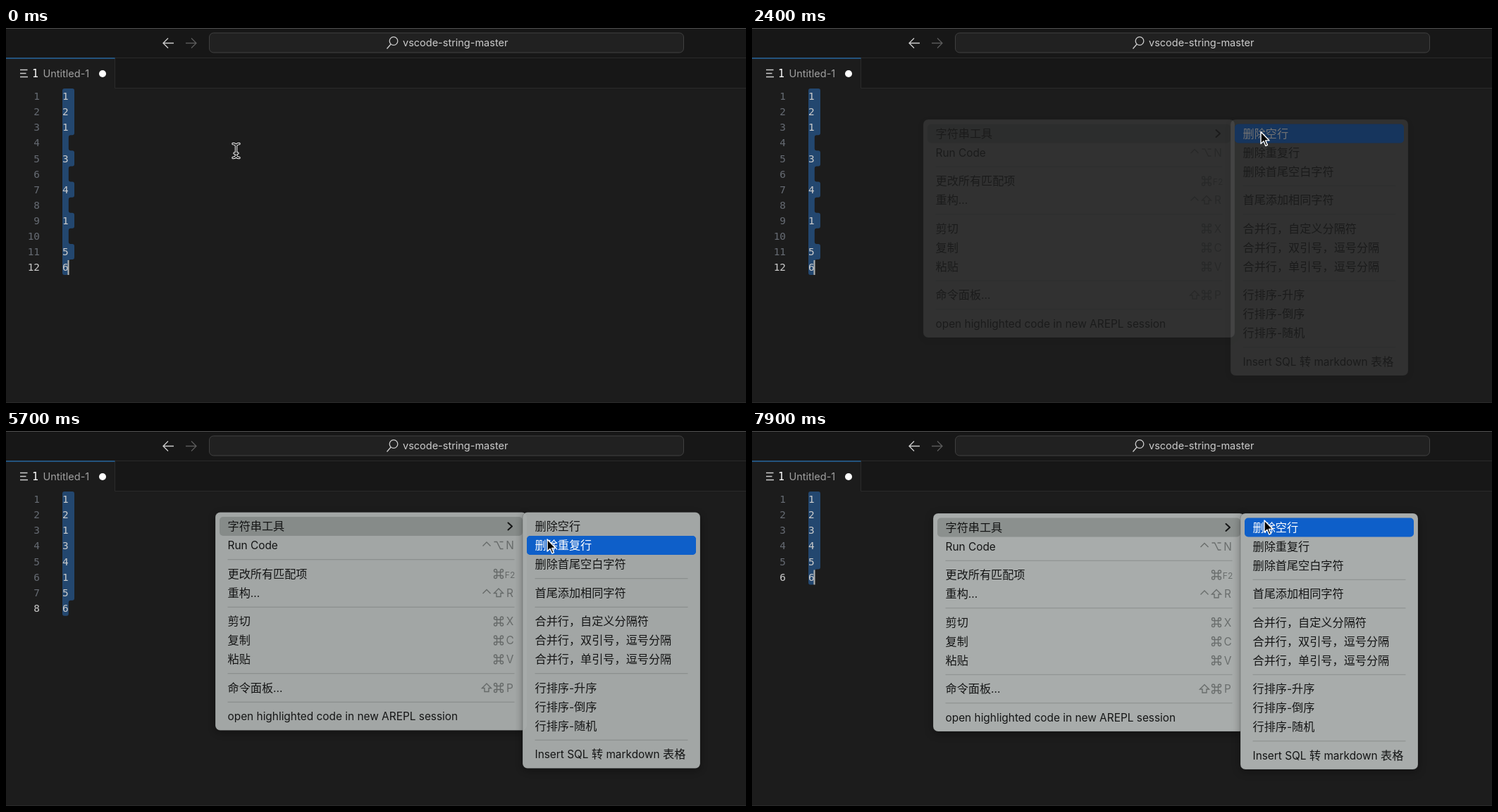
Recreate the animation shown at these times as an HTML page. Size 1050x533 px, loop 8 s.

```html
<!DOCTYPE html>
<html lang="zh-CN">
<head>
<meta charset="utf-8">
<title>String tools</title>
<style>
  html, body { margin: 0; width: 100%; height: 100%; overflow: hidden; background: #1c1c1c; }
  svg { display: block; }
  text { font-family: Inter, "Open Sans", sans-serif; white-space: pre; }
  .code text, .mono { font-family: "DejaVu Sans Mono", monospace; font-size: 14.4px; }
  .line { fill: none; stroke-width: 1.3; }
  .num { fill: #666b73; text-anchor: end; }
  .num.now { fill: #ccc; }
  .menu .bg { fill: #a8acab; stroke: rgba(0, 0, 0, .18); filter: drop-shadow(0 3px 6px rgba(0, 0, 0, .35)); }
  .menu .sep { stroke: #8a8e8d; }
  .row text { font-size: 15.4px; fill: #141515; }
  .row .cjk { font-family: "Noto Sans CJK SC", "Noto Sans CJK", sans-serif; font-size: 16.15px; }
  .row .hl { fill: none; }
  .row .key { fill: #6a6e6d; text-anchor: middle; }
  .row .small { font-size: 12px; }
  .row .sym { fill: none; stroke: #6a6e6d; stroke-width: 1.4; }
  .row .chev { fill: none; stroke: #141515; stroke-width: 2; stroke-linecap: round; stroke-linejoin: round; }
  .row.open .hl { fill: #8b908e; }
  .row.on .hl { fill: #0e5fc9; }
  .row.on text { fill: #fff; }
  .row.on .chev { stroke: #fff; }
</style>
</head>
<body>
<svg width="1050" height="533" viewBox="0 0 1050 533">
  <defs>
    <path id="beamShape" d="M-4.5-10Q-1-10 0-7.5Q1-10 4.5-10M0-7.5V7.5M-4.5 10Q-1 10 0 7.5Q1 10 4.5 10M-2.5 3.5H2.5"/>
  </defs>
  <rect width="1050" height="533" fill="#1c1c1c"/>
  <rect width="1050" height="85" fill="#171717"/>
  <rect y="43" width="154" height="43" fill="#1c1c1c"/>
  <path d="M0 .5H1050" stroke="#505050"/>
  <path d="M0 42.5H1050M154.5 43V85.5H1050M0 532.5H1050" fill="none" stroke="#2a2a2a"/>
  <path d="M0 43H154.5" stroke="#24659c" stroke-width="1.6"/>

  <g class="line" stroke="#ccc">
    <path d="M238 21.5H223M230 14.5L223 21.5L230 28.5"/>
    <path d="M255 21.5H270M263 14.5L270 21.5L263 28.5" stroke="#5a5a5a"/>
    <rect x="288.5" y="7" width="673" height="28" rx="6" fill="#212121" stroke="#404040" stroke-width="1"/>
    <circle cx="550" cy="18.5" r="5.8"/>
    <path d="M546 23L540.5 29.5M20 59.5H30.5M20 64.5H28.5M20 69.5H31"/>
  </g>
  <text x="563" y="26.3" font-size="14.5" fill="#ccc">vscode-string-master</text>
  <text class="mono" x="37" y="70.3" fill="#fff" style="font-size:15px">1</text>
  <text x="52.5" y="70.3" font-size="14.5" fill="#a0a0a0">Untitled-1</text>
  <circle cx="137" cy="65" r="5" fill="#fff"/>

  <g class="code" id="code"></g>
  <rect id="caret" x="87.5" width="2" height="21" fill="#b4b5b3"/>
  <g class="menu" id="main"></g>
  <g class="menu" id="sub"></g>
  <g id="pick"></g>

  <path id="arrow" d="M0 0V17L4 13.3L6.8 20L9.4 18.9L6.6 12.4H12Z" stroke="#fff" stroke-width="1.4" stroke-linejoin="round"/>
  <g id="beam" fill="none" stroke-linecap="round">
    <use href="#beamShape" stroke="#fff" stroke-width="3.4"/>
    <use href="#beamShape" stroke="#000" stroke-width="1.3"/>
  </g>
</svg>

<script>
const $ = id => document.getElementById(id);
const LOOP = 8000, STEP = 100;
const ROW = 27, GAP = 13.5, PAD = 6.5, SUB_X = 436;
const LINE_H = 22.09, TOP = 86;

const SYMBOLS = {
  '^': 'M-5.5 1L0-4.5L5.5 1',
  '⌥': 'M-6.5-5H-2.5L2.5 5H6.5M1.5-5H6.5',
  '⇧': 'M0-6L6.5 .5H3V5.5H-3V.5H-6.5Z',
  '⌘': 'M-2.5-2.5H2.5V2.5H-2.5ZM-2.5-2.5h-2a2 2 0 1 1 2-2zM2.5-2.5v-2a2 2 0 1 1 2 2zM2.5 2.5h2a2 2 0 1 1-2 2zM-2.5 2.5v2a2 2 0 1 1-2-2z'
};

// An empty entry is a separator; keys follow the bar.
const MAIN = ['字符串工具|>', 'Run Code|^⌥N', '', '更改所有匹配项|⌘F2', '重构...|^⇧R', '',
  '剪切|⌘X', '复制|⌘C', '粘贴|⌘V', '', '命令面板...|⇧⌘P', '',
  'open highlighted code in new AREPL session'];
const SUB = ['删除空行', '删除重复行', '删除首尾空白字符', '', '首尾添加相同字符', '',
  '合并行，自定义分隔符', '合并行，双引号，逗号分隔', '合并行，单引号，逗号分隔', '',
  '行排序-升序', '行排序-倒序', '行排序-随机', '', 'Insert SQL 转 markdown 表格'];

const SCENES = [
  { from: 0, lines: ['1', '2', '1', '', '3', '', '4', '', '1', '', '5', '6'],
    x: 243, y: 130, open: 800, subOpen: 1300, fade: 2187 },
  { from: 2500, lines: [...'12134156'], x: 297, y: 115.5, open: 4200, subOpen: 4700, fade: 5690 },
  { from: 6000, lines: [...'123456'], x: 257, y: 117, open: 6900, subOpen: 7400, fade: Infinity }
];
const FADE = 250;
const CARET_OFF = [[300, 800], [3000, 3500], [4000, 6000], [6500, 6900]];

// Pointer path: time, x, y
const PATH = [
  [0, 326.5, 174.5], [400, 243.5, 136.5], [700, 243.5, 136.5], [800, 244, 135.5], [900, 244, 135.5],
  [1200, 400, 146], [1500, 600, 149], [1800, 690, 150], [2000, 722, 147.5], [2400, 722, 147.5],
  [2700, 303, 123], [2800, 297, 122.5], [4100, 297, 122.5], [4200, 298, 120.5],
  [4400, 390, 128], [4700, 610, 131], [5000, 711, 127], [5200, 745, 138], [5500, 768, 154], [5900, 768, 154],
  [6300, 330, 118], [6500, 257.5, 124], [6800, 257.5, 124], [6900, 258, 122], [7000, 258, 122],
  [7200, 400, 131], [7500, 660, 131], [7700, 727, 127], [8000, 727, 127]
];

function pointerAt(t) {
  const i = PATH.findIndex(p => p[0] > t);
  const [a, b] = [PATH[i - 1], PATH[i]];
  const k = (t - a[0]) / (b[0] - a[0]);
  return [a[1] + (b[1] - a[1]) * k, a[2] + (b[2] - a[2]) * k];
}

// Outline of the selected rows with rounded inner and outer corners
function selection(rights) {
  const r = 3, end = TOP + rights.length * LINE_H;
  let d = `M${80 + r} ${TOP}H${rights[0] - r}q${r} 0 ${r} ${r}`;
  rights.forEach((x, i) => {
    const next = rights[i + 1], y = TOP + (i + 1) * LINE_H;
    if (next === undefined || next === x) return;
    const s = next < x ? -r : r;
    d += `V${y - r}q0 ${r} ${s} ${r}H${next - s}q${s} 0 ${s} ${r}`;
  });
  return d + `V${end - r}q0 ${r} ${-r} ${r}H${80 + r}q${-r} 0 ${-r} ${-r}V${TOP + r}q0 ${-r} ${r} ${-r}Z`;
}

function codeMarkup(lines) {
  const last = lines.length - 1;
  const rights = lines.map((s, i) => s && i < last ? 97 : 88.8);
  return `<path d="${selection(rights)}" fill="#23476f"/>` + lines.map((s, i) => {
    const y = TOP + 16.2 + i * LINE_H;
    return `<text class="num ${i === last ? 'now' : ''}" x="48" y="${y}">${i + 1}</text>
      <text x="80" y="${y}" fill="#ccc">${s}</text>`;
  }).join('');
}

function keysMarkup(keys, y) {
  if (keys === '>') return `<path class="chev" d="M415.5 ${y - 5}l5.5 5l-5.5 5"/>`;
  const syms = [...keys].filter(c => SYMBOLS[c]);
  const label = keys.slice(syms.length);
  const cls = label.length > 1 ? 'key small' : 'key';
  return syms.map((c, i) =>
    `<path class="sym" transform="translate(${402 - 17 * (syms.length - 1 - i)} ${y})" d="${SYMBOLS[c]}"/>`
  ).join('') + `<text class="${cls}" x="418" y="${y + 5.7}">${label}</text>`;
}

function buildMenu(g, items, width) {
  let y = PAD, html = '';
  const rows = [];
  for (const item of items) {
    if (!item) {
      html += `<path class="sep" d="M17.5 ${y + GAP / 2}H${width - 17.5}"/>`;
      y += GAP;
      continue;
    }
    const [label, keys] = item.split('|');
    const mid = y + ROW / 2;
    const text = label.replace(/[\u2e80-\uffff]+/g, '<tspan class="cjk">$&</tspan>');
    html += `<g class="row"><rect class="hl" x="6" y="${y}" width="${width - 12}" height="${ROW}" rx="5"/>
      <text x="17.5" y="${mid + 5.7}">${text}</text>${keys ? keysMarkup(keys, mid) : ''}</g>`;
    rows.push({ y });
    y += ROW;
  }
  g.innerHTML = `<rect class="bg" width="${width}" height="${y + PAD}" rx="7"/>` + html;
  g.querySelectorAll('.row').forEach((el, i) => rows[i].el = el);
  return { g, rows, width };
}

const main = buildMenu($('main'), MAIN, 442);
const sub = buildMenu($('sub'), SUB, 252);

function rowUnder(menu, x, y) {
  if (x < 6 || x > menu.width - 6) return;
  return menu.rows.find(r => y >= r.y && y < r.y + ROW);
}

const show = (el, on) => el.style.display = on ? '' : 'none';
const place = (el, x, y) => el.setAttribute('transform', `translate(${x} ${y})`);

function paintMenu(menu, x, y, alpha, active, cls) {
  show(menu.g, alpha > 0);
  place(menu.g, x, y);
  menu.g.style.opacity = alpha;
  menu.rows.forEach(r => r.el.setAttribute('class', r === active ? 'row ' + cls : 'row'));
}

let shown;
function render(t) {
  const scene = SCENES.findLast(s => t >= s.from);
  if (scene !== shown) {
    shown = scene;
    $('code').innerHTML = codeMarkup(scene.lines);
    $('caret').setAttribute('y', TOP + 1 + (scene.lines.length - 1) * LINE_H);
  }
  show($('caret'), !CARET_OFF.some(([a, b]) => t >= a && t < b));

  const [px, py] = pointerAt(t);
  const { x, y } = scene;
  const fade = Math.min(1, Math.max(0, 1 - (t - scene.fade) / FADE));
  const alpha = t >= scene.open ? fade : 0;
  const subAlpha = t >= scene.subOpen ? fade : 0;
  const subRow = subAlpha ? rowUnder(sub, px - x - SUB_X, py - y) : null;
  const mainRow = subRow ? main.rows[0] : rowUnder(main, px - x, py - y);

  paintMenu(main, x, y, alpha, mainRow, subRow ? 'open' : 'on');
  paintMenu(sub, x + SUB_X, y, subAlpha, subRow, 'on');

  // The chosen row fades later than its menu.
  const pick = $('pick');
  pick.replaceChildren();
  if (subRow && fade < 1) {
    pick.append(subRow.el.cloneNode(true));
    place(pick, x + SUB_X, y);
    pick.style.opacity = Math.min(1, fade * 1.8);
  }

  show($('arrow'), alpha > 0);
  show($('beam'), alpha === 0);
  place($('arrow'), px, py);
  place($('beam'), px, py);
}

const start = performance.now();
function tick() {
  const t = (performance.now() - start) % LOOP;
  render(Math.floor(t / STEP) * STEP);
  requestAnimationFrame(tick);
}
tick();
</script>
</body>
</html>
```
